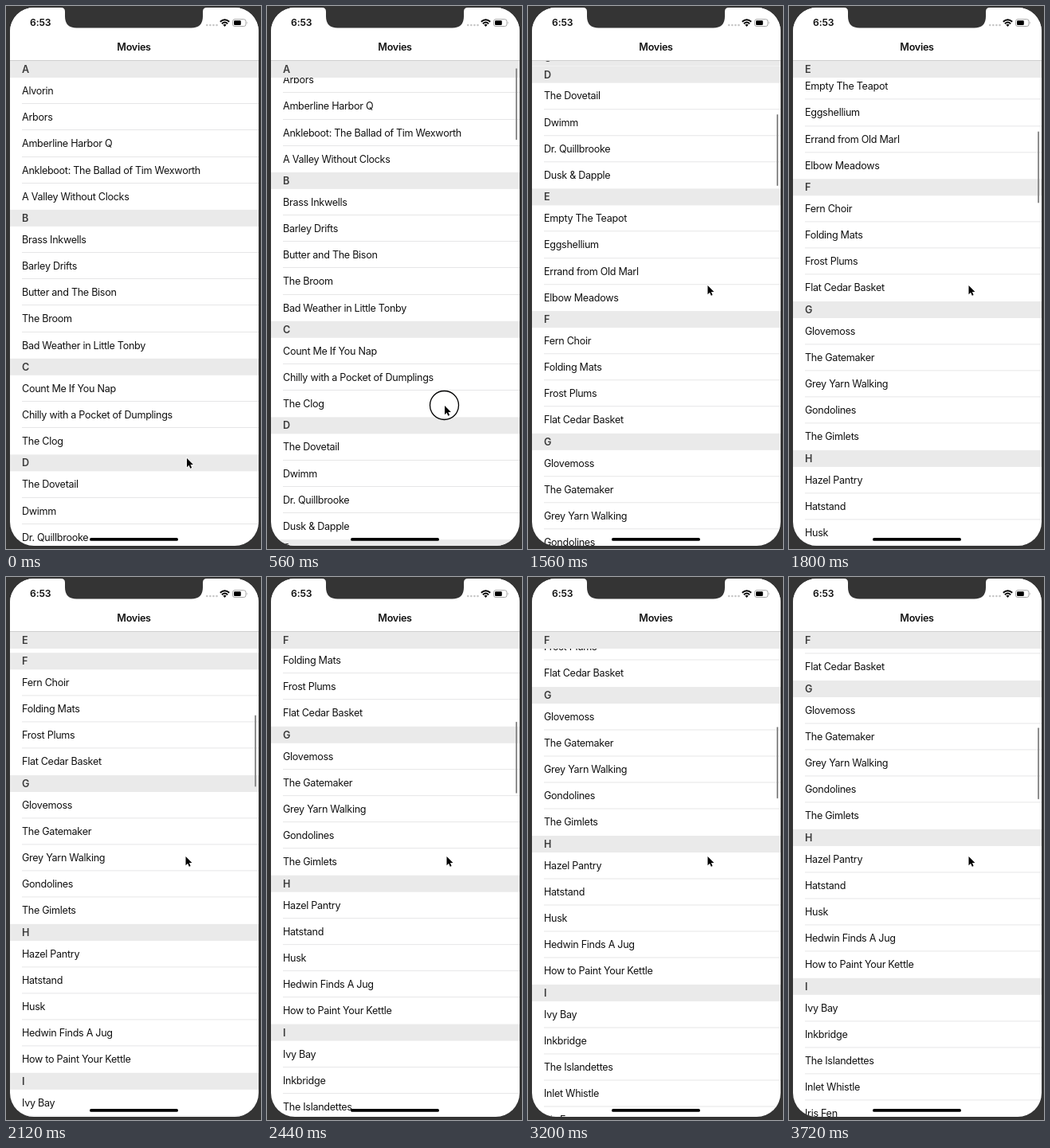
An HTML page for the animation above (3760 ms loop, 320 by 682 pixels).

```html
<!DOCTYPE html>
<html lang="en">
<head>
<meta charset="utf-8">
<title>Movies</title>
<style>
  html, body { margin: 0; width: 100%; height: 100%; overflow: hidden; background: #343434; }
  body { position: relative; font: 12.6px/1 Inter, "Liberation Sans", sans-serif; letter-spacing: -.3px; color: #111; }
  .screen { position: absolute; left: 4.5px; top: 2px; width: 312px; height: 675.7px; border-radius: 30px; overflow: hidden; background: #fff; }
  .list { position: absolute; left: 0; top: 67px; width: 100%; bottom: 0; overflow: hidden; }
  .rows { position: absolute; left: 0; top: 0; width: 100%; }
  .row, .head { position: absolute; left: 0; width: 100%; box-sizing: border-box; padding-left: 15.5px; white-space: nowrap; }
  .row { height: 33.16px; line-height: 33.16px; }
  .row.line::after { content: ""; position: absolute; left: 15.5px; right: 0; bottom: 0; height: 1px; background: #e6e6e7; }
  .head { top: 0; height: 21.1px; line-height: 21.6px; background: #eaeaea; color: #3c3c3c; font-weight: 600; }
  .nav { position: absolute; left: 0; top: 0; width: 100%; height: 66px; border-bottom: 1px solid #cfcfcf; background: #fff; }
  .nav b { position: absolute; left: 0; width: 100%; top: 43.5px; text-align: center; font-weight: 600; }
  .nav i { position: absolute; left: 25.5px; top: 13px; font-style: normal; font-weight: 600; font-size: 12.2px; letter-spacing: -.1px; }
  .bar { position: absolute; left: 307.4px; top: 0; width: 2.4px; height: 89.5px; border-radius: 2px; background: #8e8e8e; }
  svg { position: absolute; left: 0; top: 0; }
</style>
</head>
<body>
<div class="screen">
  <div class="list"><div class="rows"></div><div class="bar"></div></div>
  <div class="nav"><i>6:53</i><b>Movies</b></div>
</div>
<svg width="320" height="682" viewBox="0 0 320 682">
  <path fill="#343434" d="M69 0V2Q74 2 74 7V13Q74 27.5 88.500 27.500H232.500Q247 27.500 247 13V7Q247 2 252 2V0Z"/>
  <g fill="#c6c6c6">
    <circle cx="252.200" cy="24" r="1.300"/><circle cx="256.300" cy="24" r="1.300"/>
    <circle cx="260.400" cy="24" r="1.300"/><circle cx="264.500" cy="24" r="1.300"/>
  </g>
  <g fill="none" stroke="#000" stroke-width="1.900">
    <path d="M268.800 19.800Q274.500 14.600 280.200 19.800"/>
    <path d="M270.900 22.200Q274.500 18.900 278.100 22.200"/>
  </g>
  <path d="M272.400 23.600Q274.500 21.900 276.600 23.600L274.500 25.900Z"/>
  <rect x="284.500" y="16.700" width="16.500" height="8.800" rx="2.500" fill="none" stroke="#a5a5a5"/>
  <rect x="286" y="18.200" width="8.800" height="5.800" rx="1.200"/>
  <path fill="#a5a5a5" d="M302 19.500Q303.500 21.100 302 22.700Z"/>
  <rect x="105" y="668" width="111" height="3.800" rx="1.900"/>
  <g id="pointer">
    <circle id="ring" cx="-.5" cy="-.5" r="18" fill="none" stroke="#000" stroke-width="1.300"/>
    <path d="M0 0V11.200L2.600 8.800L4.300 12.800L6.100 12L4.400 8.100H7.900Z" stroke="#fff" stroke-width="1.200" paint-order="stroke"/>
  </g>
</svg>
<script>
const LOOP = 3760, STEP = 40, ROW = 33.16, HEAD = 21.1;
const PRESS = 480, FLING = 1320, FROM = 209.5, REST = 898.5, TAU = 464;

// scroll offset, pointer x, pointer y for each step of the drag
const drag = [
  [2, 227, 560], [19, 225, 530], [47, 223, 502], [82, 223, 470],
  [115, 223.5, 438], [139, 224, 418], [150, 224.5, 410]
];

const movies = {
  A: "Alvorin|Arbors|Amberline Harbor Q|Ankleboot: The Ballad of Tim Wexworth|A Valley Without Clocks",
  B: "Brass Inkwells|Barley Drifts|Butter and The Bison|The Broom|Bad Weather in Little Tonby",
  C: "Count Me If You Nap|Chilly with a Pocket of Dumplings|The Clog",
  D: "The Dovetail|Dwimm|Dr. Quillbrooke|Dusk & Dapple",
  E: "Empty The Teapot|Eggshellium|Errand from Old Marl|Elbow Meadows",
  F: "Fern Choir|Folding Mats|Frost Plums|Flat Cedar Basket",
  G: "Glovemoss|The Gatemaker|Grey Yarn Walking|Gondolines|The Gimlets",
  H: "Hazel Pantry|Hatstand|Husk|Hedwin Finds A Jug|How to Paint Your Kettle",
  I: "Ivy Bay|Inkbridge|The Islandettes|Inlet Whistle|Iris Fen"
};

const $ = s => document.querySelector(s);
const rows = $(".rows"), list = $(".list"), bar = $(".bar"), pointer = $("#pointer"), ring = $("#ring");

function add(parent, cls, text) {
  const el = document.createElement("div");
  el.className = cls;
  el.textContent = text;
  parent.append(el);
  return el;
}

let y = 0;
const sections = Object.entries(movies).map(([letter, titles]) => {
  const top = y;
  y += HEAD;
  titles.split("|").forEach((title, i, all) => {
    add(rows, i < all.length - 1 ? "row line" : "row", title).style.top = y + "px";
    y += ROW;
  });
  return { top, end: y, el: add(list, "head", letter) };
});
list.append(bar);

function pose(t) {
  if (t < PRESS) return [0, 227, 568];
  if (t < FLING) return drag[Math.min((t - PRESS) / STEP, drag.length - 1)];
  return [REST - (REST - FROM) * Math.exp((FLING - t) / TAU), 225.5, 351];
}

const moveY = (el, v) => { el.style.transform = `translateY(${v.toFixed(2)}px)`; };

function draw(t) {
  const [offset, px, py] = pose(t);
  moveY(rows, -offset);
  for (const s of sections) {
    // the current letter sticks to the top until the next one pushes it out
    moveY(s.el, Math.max(s.top - offset, Math.min(0, s.end - HEAD - offset)));
  }
  moveY(bar, 3 + offset * .131);
  bar.style.opacity = t < PRESS ? 0 : 1;
  ring.style.opacity = t >= PRESS && t < FLING ? 1 : 0;
  pointer.setAttribute("transform", `translate(${px} ${py})`);
}

const start = performance.now();
function tick() {
  const t = (performance.now() - start) % LOOP;
  draw(Math.floor(t / STEP) * STEP);
  requestAnimationFrame(tick);
}
tick();
</script>
</body>
</html>
```
